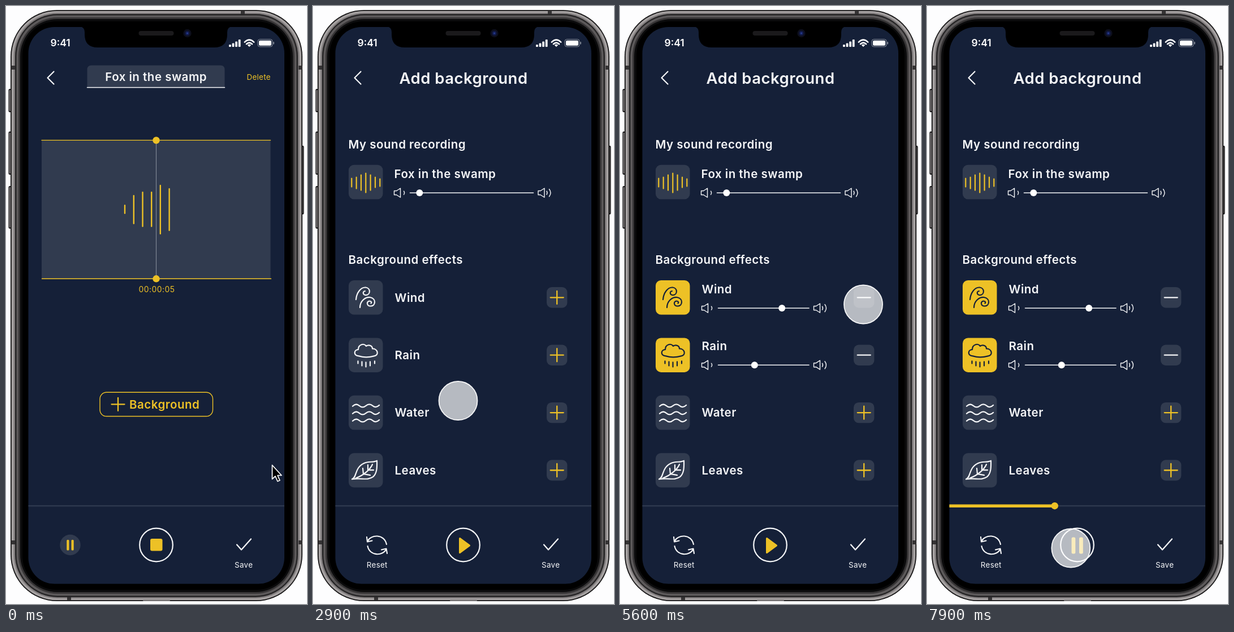
Recreate the animation shown at these times as an HTML page. Size 532x1053 px, loop 8000 ms.

```html
<!DOCTYPE html>
<html lang="en">
<head>
<meta charset="utf-8">
<title>Sound recorder</title>
<style>
  html, body { margin: 0; width: 100%; height: 100%; overflow: hidden; background: #fdfdfe; }
  svg { display: block; width: 532px; height: 1053px; font-family: Inter, "Open Sans", sans-serif; }
  .head { font-size: 27.5px; font-weight: 600; letter-spacing: .5px; }
  .label { font-size: 20.5px; font-weight: 600; letter-spacing: .5px; }
  .small { font-size: 13.4px; letter-spacing: .3px; }
  .line { fill: none; stroke-linecap: round; stroke-linejoin: round; }
</style>
</head>
<body>
<svg id="stage" viewBox="0 0 532 1053"></svg>
<script>
const LOOP = 8000, STEP = 100;
const NAVY = '#152038', TILE = '#313b4f', GOLD = '#edc126', WHITE = '#f5f6f8';
const TITLE = 'Fox in the swamp';

const text = (x, y, s, cls = 'label', fill = WHITE, anchor = 'start') =>
  `<text x="${x}" y="${y}" class="${cls}" fill="${fill}" text-anchor="${anchor}">${s}</text>`;
const path = (d, stroke = WHITE, w = 2.2) =>
  `<path class="line" d="${d}" stroke="${stroke}" stroke-width="${w}"/>`;
const box = (x, y, w, h, r, fill) =>
  `<rect x="${x}" y="${y}" width="${w}" height="${h}" rx="${r}" fill="${fill}"/>`;
const dot = (x, y, r, fill) => `<circle cx="${x}" cy="${y}" r="${r}" fill="${fill}"/>`;
const at = (x, y, s) => `<g transform="translate(${x} ${y})">${s}</g>`;
const group = (id, s) => `<g id="${id}">${s}</g>`;
const bars = (list, y, w) =>
  list.map(([x, a, b]) => path(`M${x} ${y + a}V${y + b}`, GOLD, w)).join('');

function phone() {
  const shell = [
    [8, 7, 82, '#141314'], [9.8, 8.8, 80, '#a5a1a1'], [13.5, 12, 77, '#807c7d'],
    [16, 14, 75, '#252425'], [18.5, 16.5, 72, '#5d5a5b'], [22, 20, 69, '#373536'],
    [25, 23, 66, '#0b0b0c'], [29, 27, 60, '#000']
  ];
  const buttons = [[4.5, 146, 41], [4.5, 221, 76], [4.5, 317, 75], [520, 246, 121]];
  return buttons.map(([x, y, h]) =>
      box(x, y, 6.5, h, 2, '#1d1c1d') + box(x + 1.5, y + 2, 3, h - 4, 1, '#858182')).join('') +
    shell.map(([x, y, r, c]) => box(x, y, 532 - 2 * x, 1055 - 2 * y, r, c)).join('') +
    [[9, 105], [517, 105], [9, 941], [517, 941]].map(([x, y]) => box(x, y, 7, 7, 0, '#353334')).join('') +
    box(415, 8, 7, 6, 0, '#353334') + box(108, 1041, 7, 6, 0, '#353334') +
    box(242, 1045.5, 48, 2.5, 1, '#777475') +
    box(39.5, 37, 452.5, 980.5, 46, NAVY) +
    '<path d="M130 36Q139 37 139 46V50Q139 73 162 73H368Q391 73 391 50V46Q391 37 400 36Z"/>' +
    box(234.5, 44, 62, 8, 4, '#1b1a1c') +
    dot(320.5, 48, 7.2, '#0d0f1d') + dot(320.5, 48, 4, '#111a4a') + dot(320.5, 48, 1.8, '#26398b');
}

function statusBar() {
  const signal = [4, 6.5, 9.5, 13].map((h, i) => box(394 + i * 5.6, 72 - h, 3.8, h, 1, '#fff')).join('');
  return `<text x="78.5" y="71" fill="#fff" font-size="17.5" font-weight="600">9:41</text>` + signal +
    path('M421.8 63.6Q430 55.8 438.2 63.6M425 67Q430 62.4 435 67', '#fff', 2.6) +
    '<path d="M426.8 68.8Q430 66.2 433.2 68.8L430 72Z" fill="#fff"/>' +
    `<rect x="445" y="58.7" width="26" height="13" rx="3.6" fill="none" stroke="#8f95a2"/>` +
    box(447, 60.7, 22, 9, 2, '#fff') + box(472.3, 63, 1.6, 4.5, .8, '#8f95a2');
}

const check = path('M408 948.5L416 957.5L433 938.5', WHITE, 2.3) +
  text(420.2, 988.5, 'Save', 'small', WHITE, 'middle');
const ring = '<circle cx="265.5" cy="949" r="29.3" fill="none" stroke="#f5f6f8" stroke-width="2.2"/>';

function recorder() {
  const wave = [[210, -7, 7], [225.8, -24, 25], [241.5, -30, 30], [257.2, -30, 30], [272.8, -42, 43], [288.6, -36, 37]];
  return `<path d="M143.5 143V112Q143.5 104.5 151 104.5H379Q386.5 104.5 386.5 112V143Z" fill="${TILE}"/>` +
    path('M143.5 143.4H386.5', WHITE, 1.5) +
    text(265.2, 131.5, TITLE, 'label', WHITE, 'middle') +
    text(425.5, 130, 'Delete', 'small', GOLD) +
    box(63, 237, 404.5, 243, 0, TILE) +
    path('M63 236.4H467.5M63.5 480.3H468.5', GOLD, 1.4) +
    path('M265.5 237V480', '#7f8694', 1.2) +
    dot(265.5, 236.5, 6.2, GOLD) + dot(265.5, 480.3, 6.2, GOLD) +
    bars(wave, 358, 2.4) +
    `<text x="266.5" y="504" text-anchor="middle" font-size="13.9" letter-spacing=".5" fill="${GOLD}">00:00:05</text>` +
    `<rect x="166" y="680.3" width="199.5" height="42.2" rx="11.5" fill="none" stroke="${GOLD}" stroke-width="1.4"/>` +
    path('M186.5 701.3H209.5M198 689.8V712.8', GOLD, 2.3) +
    text(218, 708.5, 'Background', 'label', GOLD) +
    dot(113.5, 949, 18.2, TILE) + box(107.3, 940, 4.2, 18.5, 1.5, GOLD) + box(115.5, 940, 4.2, 18.5, 1.5, GOLD) +
    box(255, 938, 21.5, 21.5, 3, GOLD);
}

const ICONS = {
  Wind: 'M13 34C14 21 22 12 30 12.5C39 13.5 39 25 31 26C25 26.5 24 19.500 29 19' +
    'M20 48C20 37 29 29 38 30C49 32 48 45 39 45.500C32 45.500 31 37.500 36.500 36.500C40 36.500 41 39 39.500 40.500',
  Rain: 'M18 32C8 31 9 21 17 20.500C17 11 28 9 31 14.500C36 11 42 14 42 19C52 19 54 31 45 32C36 34.500 26 34.500 18 32Z' +
    'M16.500 41V45M23.500 42V49M30.500 43V51M38 42V49M46 41V45',
  Water: [18, 31, 44].map(y => `M7 ${y + 1}q5.900-6 11.800-1t11.800 0t11.800 0t11.800-1`).join(''),
  Leaves: 'M6 46C15 43 10 26 27 18C36 14 43 17 50 13.500C50 23 51 35 43 42C33 49 22 43 6 46' +
    'M13 44C27 39 38 29 42 20M26 37L25 27M34 31V21M27 37L38 39M35 30L44 30'
};

// Quiet speaker, track with knob, loud speaker
function slider(x, y, from, to, knob) {
  const cone = 'M0-3.500H4L11-8V8L4 3.500H0Z';
  return at(x, y, path(cone + 'M17-3Q19.200 0 17 3', WHITE, 1.4)) +
    path(`M${from} ${y}H${to}`, WHITE, 1.6) + dot(knob, y, 6, '#fff') +
    at(to + 8.5, y, path(cone + 'M15-3Q17 0 15 3M19.500-6.500Q24.500 0 19.500 6.500', WHITE, 1.4));
}

function row(name, i, on, knob) {
  const y = 483 + i * 101.4, mid = y + 30.3;
  const sy = i ? 632.2 : 532;
  return box(63, y, 60.5, 60.5, 9.5, on ? GOLD : TILE) +
    at(63, y, path(ICONS[name], on ? NAVY : WHITE, 2.2)) +
    text(144.5, on ? sy - 26.3 : mid + 7.3, name) +
    (on ? slider(144.5, sy, 173.5, 334, knob) : '') +
    box(413, mid - 18.2, 36.4, 36.4, 9, TILE) +
    path(`M419.700 ${mid}H442.700` + (on ? '' : `M431.200 ${mid - 11.5}V${mid + 11.5}`), on ? WHITE : GOLD, 2.3);
}

function mixer() {
  const wave = [[68.3, -7, 8], [76.7, -9, 11], [85, -13, 14], [93.3, -16, 18], [101.6, -13, 14], [110, -9, 9], [118.3, -6, 7]];
  return text(266, 137, 'Add background', 'head', WHITE, 'middle') +
    text(62.5, 251, 'My sound recording') +
    box(63, 279.8, 60.5, 60.5, 9.5, TILE) + bars(wave, 310.5, 2.2) +
    text(143.5, 302.5, TITLE) + slider(143.5, 329, 171.5, 389.5, 188.3) +
    text(62.5, 453.8, 'Background effects') +
    group('windOff', row('Wind', 0)) + group('windOn', row('Wind', 0, true, 286.2)) +
    group('rainOff', row('Rain', 1)) + group('rainOn', row('Rain', 1, true, 237.8)) +
    row('Water', 2) + row('Leaves', 3) +
    path('M96 943C102 930 126 929 130 948M95 935L96 943.500L104.500 941.500' +
      'M96.500 951C100 969 124 969 129.500 956M131 964L129.500 955.500L121 957.500', WHITE, 2.1) +
    text(113.3, 988.5, 'Reset', 'small', WHITE, 'middle') +
    group('play', `<path d="M259.500 937.500L276.500 950L259.500 962.500Z" fill="${GOLD}" stroke="${GOLD}" stroke-width="3" stroke-linejoin="round"/>`) +
    group('playing', box(255.5, 935.5, 6.8, 29, 2.5, GOLD) + box(269, 935.5, 6.8, 29, 2.5, GOLD) +
      box(39.5, 877.6, 186, 5.4, 0, GOLD) + dot(225.7, 880.2, 6.2, GOLD));
}

document.getElementById('stage').innerHTML = phone() + statusBar() +
  path('M84.500 115.500L73.500 126.500L84.500 137.500', WHITE, 2.2) +
  box(39.5, 879, 452.5, 2.4, 0, '#2d384e') +
  group('recorder', recorder()) + group('mixer', mixer()) + ring + check +
  group('arrow', '<path d="M470.500 808.500V833L476 828L480 837L484 835.300L480 826.500H487Z" fill="#000" stroke="#fff" stroke-width="1.700" stroke-linejoin="round"/>') +
  '<circle id="touch" r="34" fill="#fff" stroke="#fff" stroke-width="1.800" stroke-opacity=".92"/>';

const el = id => document.getElementById(id);
const ease = p => p * p * (3 - 2 * p);
const linear = p => p;

// time, x, y, easing into this point
const MOVES = [
  [1100, 450, 850], [1200, 448, 848, linear], [1900, 258, 697, ease], [2200, 256.5, 695, linear],
  [2900, 256.5, 695, linear], [3900, 410, 525.5, ease], [4300, 428, 526, linear], [4600, 430, 525.5, linear],
  [5600, 430, 525.5, linear], [5800, 436, 690, linear], [6000, 434, 920, linear], [6100, 430.5, 971, linear],
  [6400, 430.5, 971, linear], [7100, 254.3, 954.5, ease]
];
const PRESS = [[0, .69], [2000, .69, linear], [2200, .44, linear], [2400, .44, linear], [2600, .69, linear]];

function sample(keys, t, col) {
  const i = keys.findIndex(k => k[0] > t);
  if (i === 0) return keys[0][col];
  if (i < 0) return keys[keys.length - 1][col];
  const a = keys[i - 1], b = keys[i];
  return a[col] + (b[col] - a[col]) * b[b.length - 1]((t - a[0]) / (b[0] - a[0]));
}

const SHOWN = {
  arrow: [0, 1100], touch: [1100, LOOP], recorder: [0, 2800], mixer: [2800, LOOP],
  windOff: [0, 4600], windOn: [4600, LOOP], rainOff: [0, 5600], rainOn: [5600, LOOP],
  play: [0, 7800], playing: [7800, LOOP]
};

function draw(t) {
  for (const [id, [from, to]] of Object.entries(SHOWN))
    el(id).style.display = t >= from && t < to ? '' : 'none';
  const touch = el('touch');
  touch.setAttribute('cx', sample(MOVES, t, 1));
  touch.setAttribute('cy', sample(MOVES, t, 2));
  touch.setAttribute('fill-opacity', sample(PRESS, t, 1));
}

const start = performance.now();
function tick() {
  const t = (performance.now() - start) % LOOP;
  draw(Math.floor(t / STEP) * STEP);
  requestAnimationFrame(tick);
}
tick();
</script>
</body>
</html>
```
